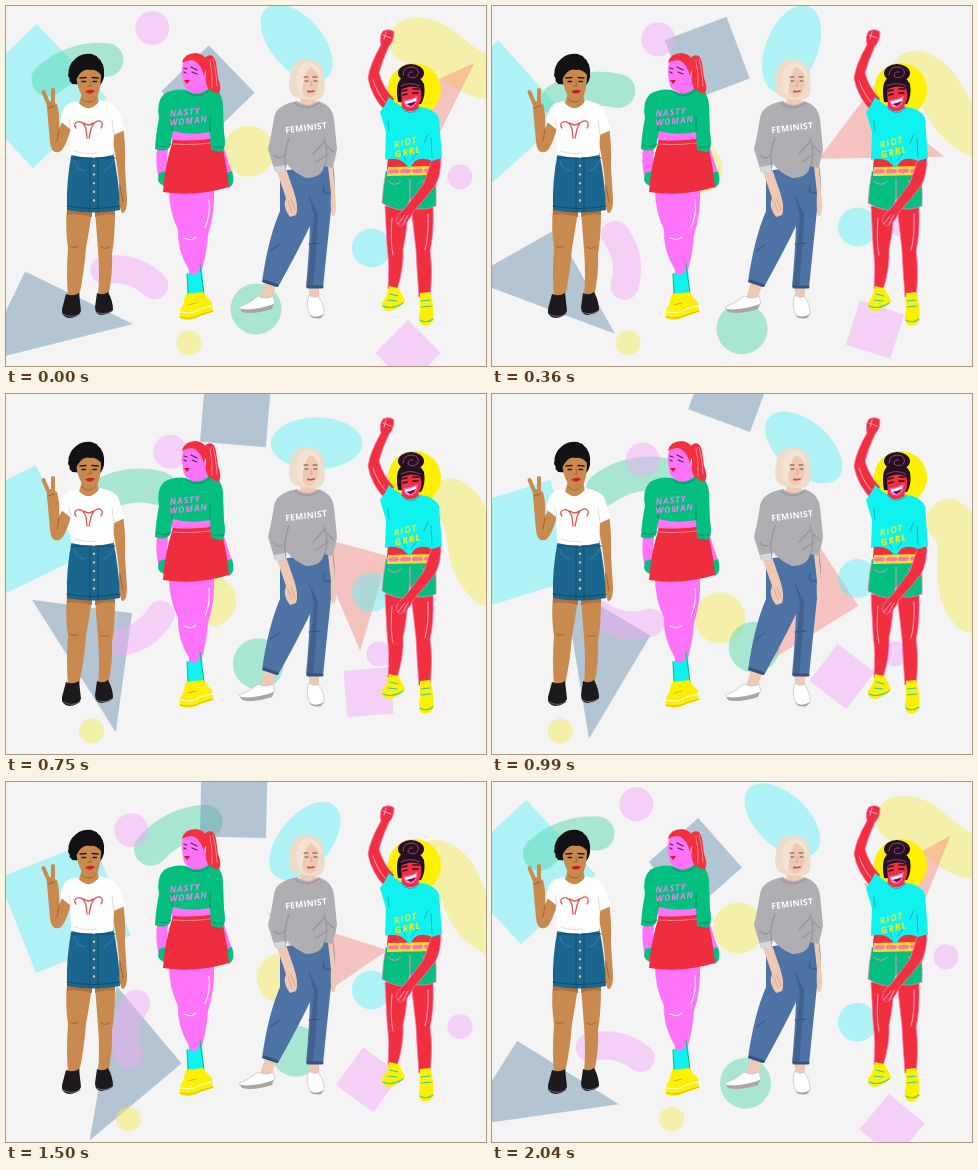
Animation of 480 by 360 pixels, one loop 2070 ms. Source, as an HTML page:

```html
<!DOCTYPE html>
<html lang="en">
<head>
<meta charset="utf-8">
<title>Four women</title>
<style>
html, body { margin: 0; width: 100%; height: 100%; overflow: hidden; background: #f4f4f4; }
svg { display: block; width: 100vw; height: 100vh; }
text { font-family: "Open Sans", "Liberation Sans", sans-serif; font-weight: 700; }
.line { fill: none; stroke-linecap: round; stroke-linejoin: round; }
</style>
</head>
<body>
<svg viewBox="0 0 480 360">
<rect width="480" height="360" fill="#f4f4f4"/>
<g id="backdrop"></g>

<g id="denim-skirt">
  <g fill="#c98a4f">
    <path d="M61 202L86 204Q83 226 80 242Q78 268 73 291H62Q60 268 62 242Q59 222 61 202Z"/>
    <path d="M89 204L109 203Q109 232 106 248Q107 268 102 291H92Q94 268 92 244Z"/>
    <path d="M106 118L116 115Q120 135 119 162L121 193Q121 207 116 207Q112 200 113 176Q110 147 105 129Z"/>
    <path d="M41 102Q40 96 44 95L51 98Q54 108 53 122L61 109L65 122Q59 144 53 146Q45 148 44 136Z"/>
    <path d="M76 87H91L93 98Q84 110 73 98Z"/>
  </g>
  <path class="line" stroke="#c98a4f" stroke-width="4" d="M43 99L37.500 86M47 98L47 84"/>
  <path class="line" stroke="#9a5e32" stroke-width=".9" d="M42 102L48 100M64 240Q68 243 72 240M95 241Q99 244 103 241M76 93Q83 100 90 92M114 180L117 196M53 124L51 135"/>
  <path fill="#b0713d" d="M61 204H86V211Q72 207 61 209ZM89 204H109V209Q99 207 89 211Z"/>
  <path fill="#1c1a1c" d="M60 288Q67 291 73 287L75 305Q72 312 63 312Q55 311 56 303ZM91 287Q97 290 102 286Q107 295 107 304Q104 308 95 309Q89 308 89 301Z"/>
  <path class="line" stroke="#6a666c" stroke-width="1" d="M57 308Q65 313 74 308M90 306Q98 310 106 305"/>
  <path fill="#1b668f" d="M66 146H107Q113 174 114 204Q88 209 61 204Q60 174 66 146Z"/>
  <path class="line" stroke="#124b6f" stroke-width="1" d="M65 152H109M84 148V206M92 148V206M61 200Q88 205 114 200"/>
  <path class="line" stroke="#3f86b3" stroke-width=".8" d="M68 155Q70 164 79 165M97 165Q105 163 107 155"/>
  <path class="line" stroke="#dfc39c" stroke-width="2.400" stroke-dasharray="0 8.700" d="M88 151V200"/>
  <path fill="#fff" d="M71 95Q83 110 94 94Q108 97 112 103L119 124L108 129L107 149Q86 154 65 149L64 123L54 115Q57 99 64 97Z"/>
  <path class="line" stroke="#d9dadd" stroke-width=".9" d="M65 124L63 113M108 129L106 114M69 145Q79 149 90 147"/>
  <path class="line" stroke="#e0584c" stroke-width="1.300" d="M81 132L80 123Q77 114 71 116Q67 118 70 122M83 132L85 123Q88 114 94 115Q98 117 95 122M78 117Q83 121 87 117"/>
  <path fill="#121113" d="M66 78Q59 66 66 56Q74 46 86 48Q99 54 98 68Q98 76 93 80Z"/>
  <path class="line" stroke="#121113" stroke-width="5" stroke-dasharray="0 5" d="M66 74Q62 66 69 57Q78 48 89 52Q98 60 95 74"/>
  <path fill="#c98a4f" d="M70 70Q72 62 79 62Q88 60 95 68Q95 84 91 91Q85 98 79 93Q72 87 70 70Z"/>
  <path fill="#121113" d="M68 72Q69 58 83 56Q96 57 97 71Q90 62 84 64Q76 61 70 74Z"/>
  <path class="line" stroke="#2c1710" stroke-width="1.500" d="M74 72L80 71.500M86 71.500L92 72M76 75.500H79.500M87 75.500H90.500"/>
  <path class="line" stroke="#9a5e32" stroke-width=".8" d="M84 75L85 80L82 80"/>
  <path fill="#c81f2b" d="M79 85.500Q84 82.500 89 85Q84 90 79 85.500Z"/>
</g>

<g id="green-sweater">
  <path fill="#fd74f8" d="M163 184L208 182Q209 208 202 229Q201 246 195 268L196 288H182L183 264Q171 244 172 224Q163 205 163 184Z"/>
  <path class="line" stroke="#fff" stroke-width="1" d="M203 194Q205 208 199 222M178 232Q186 236 190 231"/>
  <path fill="#0ff2f0" d="M181 267L188 269L196 264L198 290H182Z"/>
  <path class="line" stroke="#04bf80" stroke-width="1" d="M181 268L182 288M194 258L195 266L198 288"/>
  <path fill="#fdf000" d="M180 288L197 286Q201 292 206 296L207 306Q196 309 190 312Q180 316 174 312Q173 303 177 299Z"/>
  <path class="line" stroke="#fff" stroke-width="1" d="M175 306Q186 309 194 303L206 300"/>
  <path class="line" stroke="#d9ac00" stroke-width=".9" d="M174 311Q186 314 194 309L207 305M182 299L190 297"/>
  <path fill="#fd74f8" d="M151 142L162 141L161 160L164 178Q157 183 153 174Q149 158 151 142ZM210 143L218 142L227 170Q227 181 221 181L216 168ZM166 120L207 119L213 135L166 138Z"/>
  <path fill="#04bf80" d="M153 167L160 165L161 180Q154 180 152 174ZM220 167L226 165Q230 178 223 182Q218 179 220 167Z"/>
  <path fill="#ee2d3f" d="M167 134Q192 136 214 131Q221 158 223 181Q190 191 157 186Q159 158 167 134Z"/>
  <path class="line" stroke="#ff9aa0" stroke-width=".8" d="M167 138Q192 140 215 135"/>
  <path fill="#fd74f8" d="M185 78L198 68L206 86Q195 95 183 87Z"/>
  <path fill="#04bf80" d="M180 84Q193 92 204 81Q216 84 217 99L218 127Q221 143 215 146L205 144L204 126Q185 130 167 125L164 141Q159 147 149 143Q150 126 153 112Q150 96 158 88Q168 82 180 84Z"/>
  <path class="line" stroke="#07905f" stroke-width="1" d="M166 125L166 112M204 126L204 111M151 139Q158 143 165 138M207 141L217 141M181 86Q193 95 205 83"/>
  <g fill="#f77bf0" font-size="8.500" letter-spacing="1.100" font-style="italic" transform="rotate(-6 181 109)">
    <text x="164" y="109">NASTY</text><text x="163" y="118">WOMAN</text>
  </g>
  <path fill="#f2303f" d="M196 54Q207 43 210 57L212 72Q216 81 213 88Q209 85 208 87Q203 82 204 85Q198 78 200 66Z"/>
  <path class="line" stroke="#ff9aa0" stroke-width=".8" d="M204 54Q207 69 206 82M207 53Q210 64 211 80"/>
  <path fill="#fd74f8" d="M178 54Q175 63 176 68L177 75Q178 84 184 85Q195 83 198 71L199 55Z"/>
  <path fill="#f2303f" d="M176 57Q178 47 190 47Q199 48 201 56L198 70Q196 60 189 55Q182 53 176 57Z"/>
  <path class="line" stroke="#50204f" stroke-width="1.200" d="M178 62L181 63M185 61L191 64M186 66L191 68M178 66L180 67"/>
  <path fill="#db1234" d="M178 74L184 74L181 78Z"/>
</g>

<g id="grey-sweater">
  <path fill="#efc9b3" d="M259 276L270 279L265 295L253 296ZM303 279H313L313 294H303Z"/>
  <path fill="#fff" stroke="#bfc1c5" stroke-width=".7" d="M252 290Q260 294 267 290L269 297Q264 303 249 305Q235 306 233 301Q243 298 252 290ZM303 289Q308 293 312 290Q319 299 318 309Q310 314 304 309Q299 299 303 289Z"/>
  <path fill="#aaa5a3" d="M234 303Q249 305 268 298L266 303Q247 309 236 306ZM303 309Q310 313 318 308L315 312Q307 314 303 309Z"/>
  <path fill="#4d72a4" d="M274 165L327 158Q331 182 325 204Q321 242 317 282L300 281Q303 249 304 220Q292 245 272 281L256 276Q262 233 274 205Q274 180 274 165Z"/>
  <path fill="#41628f" d="M302 186L308 210L301 281L307 282Q311 240 312 208Z"/>
  <path class="line" stroke="#34537f" stroke-width="1" d="M318 180Q315 189 324 187M264 245L273 239M303 238L314 237"/>
  <path class="line" stroke="#34537f" stroke-width="3" d="M258 275L271 279.500M302 281H316"/>
  <path fill="#efc9b3" d="M270 163L279 160L288 186Q293 201 290 209L284 211Q276 201 280 192ZM322 160L327 160L330 200Q330 211 326 210Q324 202 325 187ZM295 86H310V99Q302 104 294 98Z"/>
  <path class="line" stroke="#d69e88" stroke-width=".8" d="M282 195L286 206M285 193L289 204M295 90Q303 97 309 91"/>
  <path fill="#aeaeb3" d="M291 95Q302 103 312 95Q326 99 328 113L331 143Q329 155 326 162L318 160Q316 172 300 172Q288 167 281 158L279 167L269 166L262 143Q266 126 268 112Q270 99 291 95Z"/>
  <path class="line" stroke="#96969c" stroke-width="1.300" d="M279 160Q278 145 283 132M319 160Q323 145 318 132M268 149Q274 155 278 149M289 97Q301 106 313 97M321 140L328 146M307 148L318 136M310 156L322 148"/>
  <path fill="#d7d7da" d="M268 161L279 159L279 167L269 166Z"/>
  <text x="279" y="125" fill="#fff" font-size="8.700" letter-spacing=".2" transform="rotate(-7 298 121)">FEMINIST</text>
  <path fill="#eedccb" d="M287 90Q281 84 284 70Q285 53 303 53Q319 56 318 73Q321 87 314 93Q300 96 287 90Z"/>
  <path fill="#efc9b3" d="M294 69Q299 61 307 62Q314 68 312 82Q309 91 303 92Q296 89 294 80Z"/>
  <path fill="#f2e3d4" d="M292 86Q287 65 298 57Q310 53 315 70Q309 64 304 60Q297 69 296 88Z"/>
  <path class="line" stroke="#6a4d43" stroke-width="1.100" d="M298 71H302M307 71H311M299 75H302M308 75H311"/>
  <path class="line" stroke="#d69e88" stroke-width=".8" d="M305 75L306 80H304"/>
  <path class="line" stroke="#c54c4b" stroke-width="1.800" d="M302 85.500Q305 86 308 85"/>
</g>

<g id="cyan-shirt">
  <circle cx="408.500" cy="83.500" r="26.500" fill="#fdf000"/>
  <g fill="#f0303f" stroke="#ff79b8" stroke-width=".8">
    <path d="M379 200L402 201Q401 226 397 243Q398 261 391 284L382 283Q384 260 381 239Z"/>
    <path d="M405 200L427 200Q428 229 424 245Q427 265 424 291H413Q411 265 410 244Z"/>
    <path d="M375 39Q373 30 377 25Q384 22 388 26Q388 35 383 40Q376 55 373 67Q377 82 388 93L380 106Q365 90 362 72Q364 58 375 39Z"/>
    <path d="M396 98L412 96L414 108Q403 114 395 106Z"/>
  </g>
  <path class="line" stroke="#ff9ccb" stroke-width="1" d="M377 29L385 32M380 26L378 33M367 74Q371 87 379 96M386 212Q384 235 387 249M422 208Q423 230 419 244"/>
  <path fill="#fdf000" d="M383 280L392 282Q398 291 399 296Q391 304 383 305Q375 304 376 297Q381 292 383 280ZM414 287L424 286Q429 302 427 315Q423 321 416 319Q411 315 414 304Z"/>
  <path class="line" stroke="#35c9b0" stroke-width="1.100" d="M384 288L392 290M382 294L391 295M377 300Q386 304 397 297M415 295L424 294M415 301L425 300M414 314Q420 318 427 313"/>
  <path fill="#f0303f" d="M382 148L428 148L428 163L381 164Z"/>
  <path fill="#04bf80" stroke="#f08cc0" stroke-width=".7" d="M380 165L428 164Q431 182 430 200Q419 205 407 202L404 192L401 204Q389 205 376 197Q377 180 380 165Z"/>
  <path class="line" stroke="#f08cc0" stroke-width="1" d="M404 173V192M382 175Q389 182 395 175M416 174Q420 182 428 176"/>
  <path fill="#ffdf25" d="M382 161L429 160L429 169L381 170Z"/>
  <path class="line" stroke="#f777ba" stroke-width="4" stroke-dasharray="7 5" stroke-linecap="butt" d="M384 165.500L428 164.500"/>
  <path fill="#f0303f" stroke="#ff79b8" stroke-width=".7" d="M427 150L435 150Q435 170 429 180Q419 193 407 206Q402 218 394 220Q388 217 392 209L400 201L418 177Z"/>
  <path class="line" stroke="#ff9ccb" stroke-width="1" d="M399 209L392 218M402 209L397 218"/>
  <path fill="#0ff2f0" d="M383 91Q389 97 395 100Q402 110 414 101Q428 102 433 112L436 152L426 155Q415 150 408 156L404 162L396 155Q387 151 379 154L380 126L374 106Q379 100 383 91Z"/>
  <path class="line" stroke="#09b9c0" stroke-width="1" d="M383 125L382 115M426 151L425 132M400 155L396 147M405 155L411 147M422 128L418 137M395 101Q403 112 414 102"/>
  <g fill="#f2ed16" font-size="9" letter-spacing="1.200" font-style="italic" transform="rotate(-13 401 138)">
    <text x="388" y="139">RIOT</text><text x="387" y="149">GRRL</text>
  </g>
  <path fill="#24111f" d="M392 96Q388 74 399 70Q414 68 418 78Q420 90 415 98Z"/>
  <ellipse cx="405" cy="67" rx="13" ry="9" fill="#24111f"/>
  <path class="line" stroke="#b23c83" stroke-width=".9" d="M397 69Q397 61 406 61Q414 62 412 69Q407 74 402 70Q402 65 407 66M395 80Q404 75 414 80"/>
  <path fill="#f0303f" d="M395 84Q404 78 414 82Q418 93 411 101Q403 107 396 100Z"/>
  <path class="line" stroke="#32101c" stroke-width="1.600" d="M396 85L401 84M407 83L413 83M397 89L401 88M407 87L412 87"/>
  <path fill="#fff" stroke="#f567c3" stroke-width="1.300" d="M398 95Q405 94 411 91Q411 100 404 101Q399 101 398 95Z"/>
  <path fill="#7c0d3d" d="M400 98Q405 97 410 95Q408 100 404 100Z"/>
</g>
</svg>
<script>
const LOOP = 2070, STEP = 30;
const COLORS = {
  cyan: '#59f0f5', teal: '#4ed5a9', pink: '#f4a4f9',
  yellow: '#f6ec4e', blue: '#648cab', salmon: '#f6887f'
};
const backdrop = document.getElementById('backdrop');

// Each motion maps the loop time in ms to a value.
const turn = t => 360 * t / LOOP;
const cosine = degrees => Math.cos(degrees * Math.PI / 180);
const still = value => () => value;
const spin = start => t => start + turn(t);
const wave = (mid, reach, peak) => t => mid + reach * cosine(turn(t) - peak);
// From a to b at the peak time, then back to a.
const swing = (a, b, peak, power = 1) => t =>
  a + (b - a) * (t < peak ? t / peak : (LOOP - t) / (LOOP - peak)) ** power;
// Position on a closed polyline with equal time per leg.
const tour = (...stops) => t => {
  const leg = t / LOOP * stops.length, i = Math.floor(leg);
  return stops[i] + (stops[(i + 1) % stops.length] - stops[i]) * (leg - i);
};
const orbit = (cx, cy, r, start, direction) => [
  t => cx + r * cosine(start + direction * turn(t)),
  t => cy + r * cosine(start + direction * turn(t) - 90)
];

const movers = [];
function add(color, d, [x, y], angle = still(0), stroke = 0) {
  const el = document.createElementNS('http://www.w3.org/2000/svg', 'path');
  el.setAttribute('d', d);
  el.setAttribute('opacity', 0.45);
  el.setAttribute('fill', stroke ? 'none' : COLORS[color]);
  if (stroke) {
    el.setAttribute('stroke', COLORS[color]);
    el.setAttribute('stroke-width', stroke);
    el.setAttribute('stroke-linecap', 'round');
  }
  backdrop.append(el);
  movers.push({ el, x, y, angle });
}
const ellipse = (rx, ry = rx) => `M${-rx} 0A${rx} ${ry} 0 1 1 ${rx} 0A${rx} ${ry} 0 1 1 ${-rx} 0Z`;
const square = s => `M${-s / 2} ${-s / 2}h${s}v${s}h${-s}Z`;

add('cyan', square(102), orbit(29, 120, 30, -90, -1), wave(60, 15, 205));
add('teal', 'M-30 5Q0 -9 31 2', [swing(70, 174, 1480), wave(71, 25, 115)], wave(-14, 10, 100), 34);
add('blue', 'M-101 -120H0V0Z', [swing(127, 67, 1400, 2), swing(318, 365, 1740)], swing(-64, 70, 1400));
add('pink', 'M-26 4Q0 -9 26 4', [wave(128, 7, 120), swing(268, 228, 1000)], spin(17), 28);
add('blue', square(66), [swing(202, 244, 1140), swing(86, -18, 1140)], swing(46, 120, 1140));
add('pink', ellipse(17), orbit(147, 44, 22, -92, 1));
add('yellow', ellipse(25.5), orbit(238, 185, 40, -83, -1));
add('teal', ellipse(25.5), [tour(250, 250, 250, 264, 290, 290), tour(303, 325, 274, 250, 262, 283)]);
add('yellow', ellipse(12.5), [swing(183, 62, 930), still(337)]);
add('cyan', ellipse(46, 26), [wave(301, 11, 160), swing(37, 61, 1450)], spin(49));
add('yellow', 'M-46 2C-20 -18 8 18 46 0', [swing(448, 470, 960), swing(52, 175, 960)], swing(24, 78, 960), 45);
add('salmon', 'M-65 27H34L32 -53Z', [swing(420, 290, 1330), wave(158, 50, 185)], spin(156));
add('cyan', ellipse(19.5), [still(365.5), swing(242, 181, 1050)]);
add('pink', ellipse(12.5), [tour(454, 365, 454), tour(171, 260, 260)]);
add('pink', square(46.5), [swing(402, 340, 1180), swing(347, 270, 1180)], spin(45));

function draw(t) {
  for (const { el, x, y, angle } of movers)
    el.setAttribute('transform', `translate(${x(t).toFixed(2)} ${y(t).toFixed(2)}) rotate(${angle(t).toFixed(2)})`);
}
const start = performance.now();
function tick() {
  const elapsed = (performance.now() - start) % LOOP;
  draw(Math.floor(elapsed / STEP) * STEP);
  requestAnimationFrame(tick);
}
tick();
</script>
</body>
</html>
```
